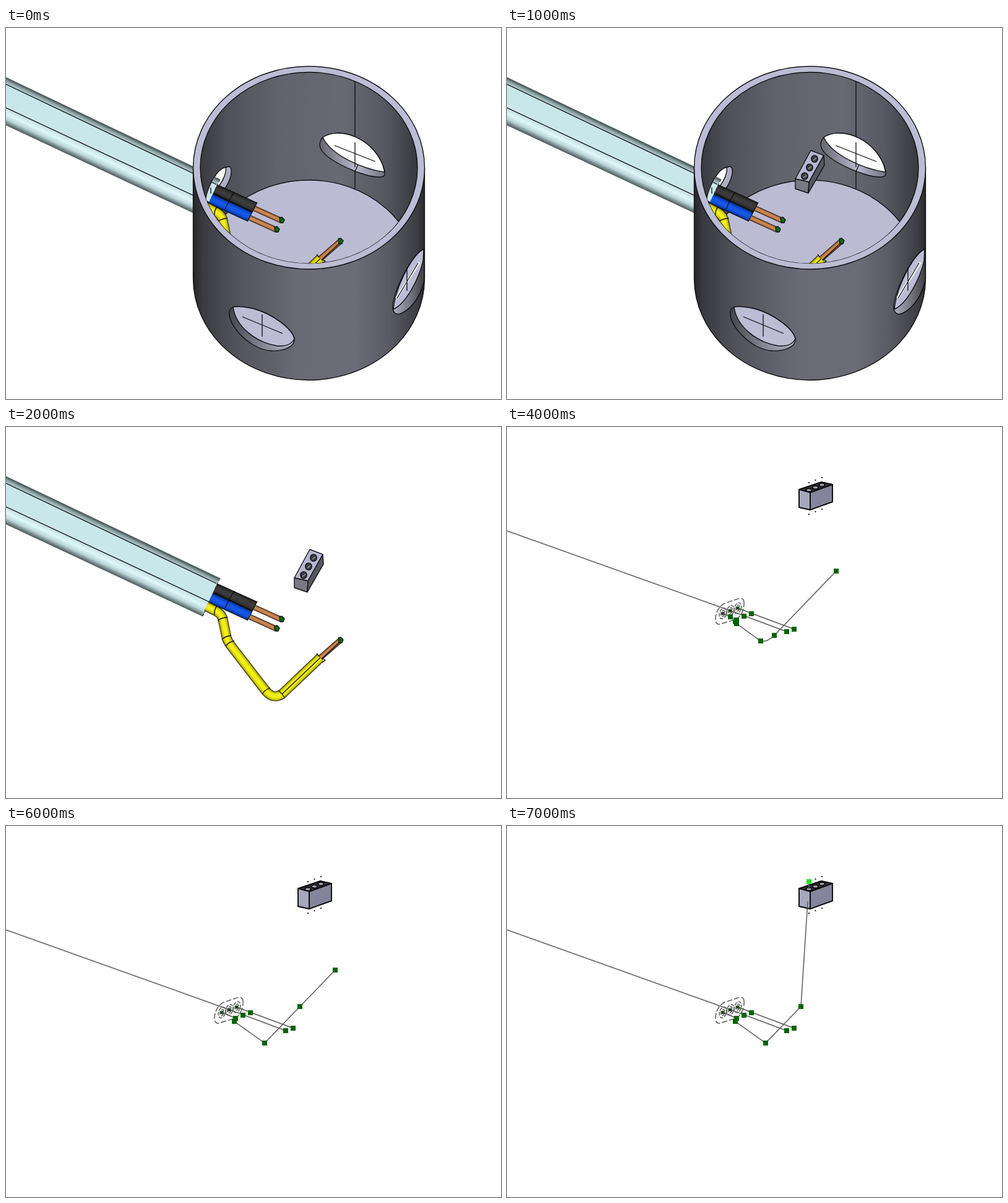
Animation, 800 px wide and 600 px high, one loop 8 s. Source, as an HTML page:

```html
<!DOCTYPE html>
<html lang="en">
<head>
<meta charset="utf-8">
<title>Wiring a junction box</title>
<style>
html, body { margin: 0; width: 100%; height: 100%; overflow: hidden; background: #fff; }
svg { display: block; width: 800px; height: 600px; }
.edge { fill: none; stroke: #0c0c0c; stroke-width: 1.3; }
.sketch { fill: none; stroke: #5a5a5a; stroke-width: 1.5; }
.face { stroke: #101012; stroke-width: 1.4; stroke-linejoin: round; }
</style>
</head>
<body>
<svg id="stage" viewBox="0 0 800 600"></svg>
<script>
const STEP = 1000, STEPS = 8;

const path = (d, attrs = 'class="edge"') => `<path d="${d}" ${attrs}/>`;
const fill = (d, color) => path(d, `fill="${color}"`);
const face = (d, color) => path(d, `class="face" fill="${color}"`);
const oval = (x, y, rx, ry, attrs) => `<ellipse cx="${x}" cy="${y}" rx="${rx}" ry="${ry}" ${attrs}/>`;
const layer = (steps, body) => `<g data-steps="${steps}" visibility="hidden">${body}</g>`;
const clip = (id, body) => `<clipPath id="${id}">${body}</clipPath>`;

function gradient(id, [x1, y1, x2, y2], ...stops) {
  const list = stops.map(([at, color]) => `<stop offset="${at}" stop-color="${color}"/>`).join('');
  return `<linearGradient id="${id}" gradientUnits="userSpaceOnUse" x1="${x1}" y1="${y1}" x2="${x2}" y2="${y2}">${list}</linearGradient>`;
}

// A round wire: strokes from the dark rim to the lit middle
function tube(d, width, [dark, mid, light]) {
  return [['#111', width], [dark, width - 1.6], [mid, width * .74], [light, width * .42]]
    .map(([color, w]) => path(d, `fill="none" stroke="${color}" stroke-width="${w}" stroke-linejoin="round"`)).join('');
}

const YELLOW = ['#8c8800', '#d2ce08', '#f2ef16'];
const OLIVE = ['#4e4b00', '#777306', '#89850c'];
const BLUE = ['#07266f', '#0d46c4', '#1557e6'];
const BLACK = ['#1c1c1c', '#303030', '#3b3b3b'];
const COPPER = ['#70401f', '#a8673a', '#c98750'];

const tip = (x, y) => face(`M${x - 3},${y - 4}l4,-1 4,4 -2,5 -5,0z`, '#0a6a12');

// Geometry seen from above
const inner = oval(489.5, 226, 175.5, 154.5, '');
const leftHole = 'M323,279C326,255 344,226 361,224C367,228 364,243 356,256L336,284Z';
const backHole = 'M512,177C535,160 590,174 609,222C614,235 614,241 604,241C580,242 520,216 509,196C505,188 508,181 512,177Z';
const frontHole = 'M361,458C363,447 382,450 400,454C430,462 463,486 466,503C467,517 445,523 428,522C394,520 357,480 361,458Z';
const sideHole = 'M676,357C660,362 630,415 625,448C624,462 632,465 640,461C658,452 671,431 676,408Z';

const defs = '<defs>'
  + gradient('wall', [302, 0, 676, 0], [0, '#252529'], [.04, '#393940'], [.18, '#52525b'], [.45, '#6a6a76'], [.7, '#6c6c78'], [.85, '#5a5a64'], [.97, '#3c3c43'], [1, '#29292d'])
  + gradient('bore', [314, 0, 665, 0], [0, '#39393f'], [.12, '#505059'], [.35, '#62626c'], [.65, '#696974'], [.84, '#595963'], [1, '#38383e'])
  + gradient('lip', [360, 0, 467, 0], [0, '#43434a'], [.5, '#858593'], [1, '#b2b2c8'])
  + gradient('backLip', [507, 0, 613, 0], [0, '#66666f'], [.55, '#b8b8cf'], [1, '#72727d'])
  + gradient('sideLip', [625, 0, 676, 0], [0, '#b0b0c4'], [.5, '#7b7b88'], [1, '#3e3e44'])
  + gradient('coverTop', [0, 80, -4.3, 89], [0, '#3f4a4b'], [.4, '#829799'], [1, '#b9d5d9'])
  + gradient('coverLow', [0, 129, -10.8, 152], [0, '#c3dfe3'], [.35, '#def7f9'], [.65, '#b9d5d8'], [1, '#4b5859'])
  + gradient('coverSide', [0, 160, -11, 192], [0, '#94afb3'], [.3, '#b5d2d6'], [.55, '#bddce0'], [.85, '#9ab5b9'], [1, '#647779'])
  + clip('inside', inner)
  + clip('opening', `<path d="${leftHole}"/>`)
  + '</defs>';

const cover = fill('M0,80L346,245 340,254 0,91Z', 'url(#coverTop)')
  + fill('M0,91L340,253 328,283 0,129Z', '#c9e7eb')
  + fill('M0,129L329,283 318,306 0,157Z', 'url(#coverLow)')
  + path('M0,91L340,253M0,129L329,283')
  + path('M0,80L346,245M0,157L318,306', 'fill="none" stroke="#566465"')
  + path('M346,245L340,256 328,284 318,306', 'fill="none" stroke="#222" stroke-dasharray="5 2"');

const wires = tube('M338,261L402,290', 17.5, BLACK)
  + tube('M331,276L394,305', 17.5, BLUE)
  + path('M369,265Q361,277 354,293M406,282L390,313M338,268L398,298')
  + tube('M402,292L444,311', 9, COPPER) + tip(445, 311)
  + tube('M394,307L436,326', 9, COPPER) + tip(437, 326)
  + tube('M324,290L338,297Q347,301 350,309L356,338Q357,345 363,353L420,427Q432,441 446,432L508,373', 16, YELLOW)
  + path('M341,289Q336,296 337,304M358,308Q349,308 342,313M364,337Q356,338 349,343M369,346Q361,347 355,354M427,422Q418,425 414,432M440,426Q446,431 450,437M446,432L508,373M502,366L506,371 516,377 511,381')
  + tube('M508,373L539,346', 9, COPPER) + path('M510,375L540,347') + tip(540, 345);

const cup = fill('M302.5,226V405A187,164.5 0 0 0 676.5,405V226Z', 'url(#wall)')
  + path('M302.5,226V405A187,164.5 0 0 0 676.5,405V226')
  + oval(489.5, 226, 187, 164, 'class="face" fill="#bcbcd5"')
  + oval(489.5, 226, 175.5, 154.5, 'class="face" fill="url(#bore)"')
  + `<g clip-path="url(#inside)">${oval(489.5, 400.5, 175.5, 154.5, 'class="face" fill="#bbbbd4"')}</g>`
  + path('M564,86V260')
  + face(backHole, 'url(#backLip)')
  + face('M512,177C535,160 590,174 609,222L612,233C575,228 525,205 512,177Z', '#fff')
  + path('M569,221L564,232M531,190L597,216M564,185V225')
  + face(frontHole, 'url(#lip)')
  + face('M367,451C380,449 392,452 400,454C430,462 463,486 466,503C460,514 449,515 438,514C402,508 371,482 367,451Z', '#bcbcd5')
  + path('M382,467L447,494M414,463V499')
  + face(sideHole, 'url(#sideLip)')
  + face('M675,358C660,362 630,415 626,455C646,446 667,407 674,377Z', '#bcbcd5')
  + path('M631,437L668,379', 'fill="none" stroke="#fff" stroke-width="4"')
  + path('M632,437L666,380M648,387V425')
  + `<g clip-path="url(#inside)">${face(leftHole, '#aeaec4')}`
  + face('M323,279C326,255 341,228 355,225C357,234 350,248 345,254L332,280Z', '#fff')
  + `<g clip-path="url(#opening)">${cover}</g>${path('M331,258V268')}<use href="#wires"/></g>`;

const terminalTop = face('M466,244L491,198 512,206 488,249Z', '#b7b7d0')
  + face('M466,244L488,249 487,267 466,260Z', '#797986')
  + face('M488,249L512,206 513,222 487,267Z', '#56565f')
  + [0, 1, 2].map(i => oval(497 - 8 * i, 211.5 + 14 * i, 5.2, 5.6, 'class="face" fill="#3b3b42"')
    + path(`M${495 - 8 * i},${214 + 14 * i}l5,-4`, 'stroke="#85858f" stroke-width="2"')).join('');

// Geometry seen from the side
const rim = 'M383,284C383,276 378,276 370,279L352,285C342,289 336,303 337,313C338,320 343,320 350,317L370,311C378,308 384,293 383,284Z';

const terminalSide = face('M472,101L508,89 526,93 490,106Z', '#303035')
  + face('M472,101L490,106V134L472,130Z', '#a6a7bd')
  + face('M490,106L526,93V121L490,134Z', '#84849a')
  + path('M472,101L508,89 526,93V121L490,134 472,130ZM472,101L490,106 526,93M490,106V134', 'class="edge" style="stroke-width:1.8"')
  + [0, 1, 2].map(i => {
    const x = 488 + 10.5 * i, y = 102 - 4.2 * i;
    return oval(x, y, 4.5, 2.6, 'fill="#a4a4b4" stroke="#050505" stroke-width="1.6"')
      + [90, 141].map(top => `<rect x="${x - 1}" y="${top - 1 - 4.1 * i}" width="2" height="2" fill="#222210"/>`).join('');
  }).join('');

const sideCable = fill('M0,142L376,276 383,284 350,286 0,160Z', '#5a6868')
  + fill('M0,160L352,285 338,303 342,319 0,195Z', 'url(#coverSide)')
  + path('M0,142L376,276M0,160L352,285', 'class="edge" style="stroke-width:1.8"')
  + path('M0,195L342,319', 'fill="none" stroke="#59696b"')
  + path(rim, 'fill="#abc5c9" stroke="#eee"')
  + path(rim, 'fill="none" stroke="#777" stroke-dasharray="5 3"')
  + tube('M372,290L430,309', 12, BLACK) + path('M398,292L393,303')
  + tube('M425,311L463,326', 9, COPPER) + tip(463, 327)
  + tube('M360,294L417,317', 16, BLUE) + path('M384,294Q377,302 379,312M421,309Q413,315 413,325')
  + tube('M414,317L452,331', 9, COPPER) + tip(452, 331)
  + tube('M345,301L364,308', 15, YELLOW) + path('M361,297Q355,304 357,313')
  + tube('M359,305Q369,304 372,309L367,315', 10, OLIVE)
  + tube('M366,312L407,344', 17, OLIVE)
  + tube('M407,344Q418,353 433,336', 17, YELLOW)
  + tube('M433,336L498,266', 17, YELLOW)
  + path('M374,306Q361,308 363,319M413,338Q402,340 402,349M426,330L439,342M408,342Q418,348 428,336L496,264M492,261L504,271')
  + tube('M499,265L531,234', 9, COPPER) + path('M500,264L530,233') + tip(532, 233);

// Centre-line sketch
const line = d => path(d, 'class="sketch"');
const nodes = (...points) => points.map(([x, y, color = '#006400']) =>
  `<rect x="${x - 4}" y="${y - 4}" width="8" height="8" fill="${color}"/>`).join('');

const skeleton = line('M0,168L361,297 452,331M373,293L464,327')
  + path(rim, 'class="sketch" stroke-dasharray="9 3"')
  + [0, 1, 2].map(i => {
    const x = 349 + 12 * i, y = 301.5 - 4.3 * i;
    return [[5.5, 9], [3, 5]].map(([rx, ry]) =>
      oval(x, y, rx, ry, `class="sketch" stroke-dasharray="6 2" transform="rotate(18 ${x} ${y})"`)).join('')
      + `<rect x="${x - 2.5}" y="${y - 2.5}" width="5" height="5" fill="#173f17"/>`;
  }).join('')
  + nodes([383, 306], [395, 302], [452, 331], [464, 327]);

const corners = [[371, 311], [369, 316], [418, 351]];
const bend = 'M349,301L371,311 369,316 418,351';

document.getElementById('stage').innerHTML = defs
  + `<defs><g id="wires">${wires}</g></defs>`
  + layer('012', cover)
  + layer('01', cup)
  + layer('2', '<use href="#wires"/>')
  + layer('12', terminalTop)
  + layer('3', sideCable)
  + layer('4567', skeleton)
  + layer('4', line('M349,301L361,307Q371,311 370,313L369,315 371,318 410,346Q419,349 432,337L532,233')
    + nodes([361, 307], [371, 312], [369, 315], [371, 318], [410, 346], [432, 337], [532, 233]))
  + layer('5', line(bend + 'L532,233') + nodes(...corners, [532, 233]))
  + layer('6', line(bend + 'L475,292 532,233') + nodes(...corners, [475, 292], [532, 233]))
  + layer('7', line(bend + 'L475,292 486,122') + nodes(...corners, [475, 292]))
  + layer('34567', terminalSide)
  + layer('7', line('M486,122L485.3,133M488,92V102') + nodes([488, 90, '#20e820']));

const layers = [...document.querySelectorAll('[data-steps]')];
const start = performance.now();
let shown = -1;

function draw(now) {
  const step = Math.floor(Math.max(0, now - start) / STEP) % STEPS;
  if (step !== shown) {
    for (const g of layers) {
      g.setAttribute('visibility', g.dataset.steps.includes(step) ? 'visible' : 'hidden');
    }
    shown = step;
  }
  requestAnimationFrame(draw);
}
draw(start);
</script>
</body>
</html>
```
